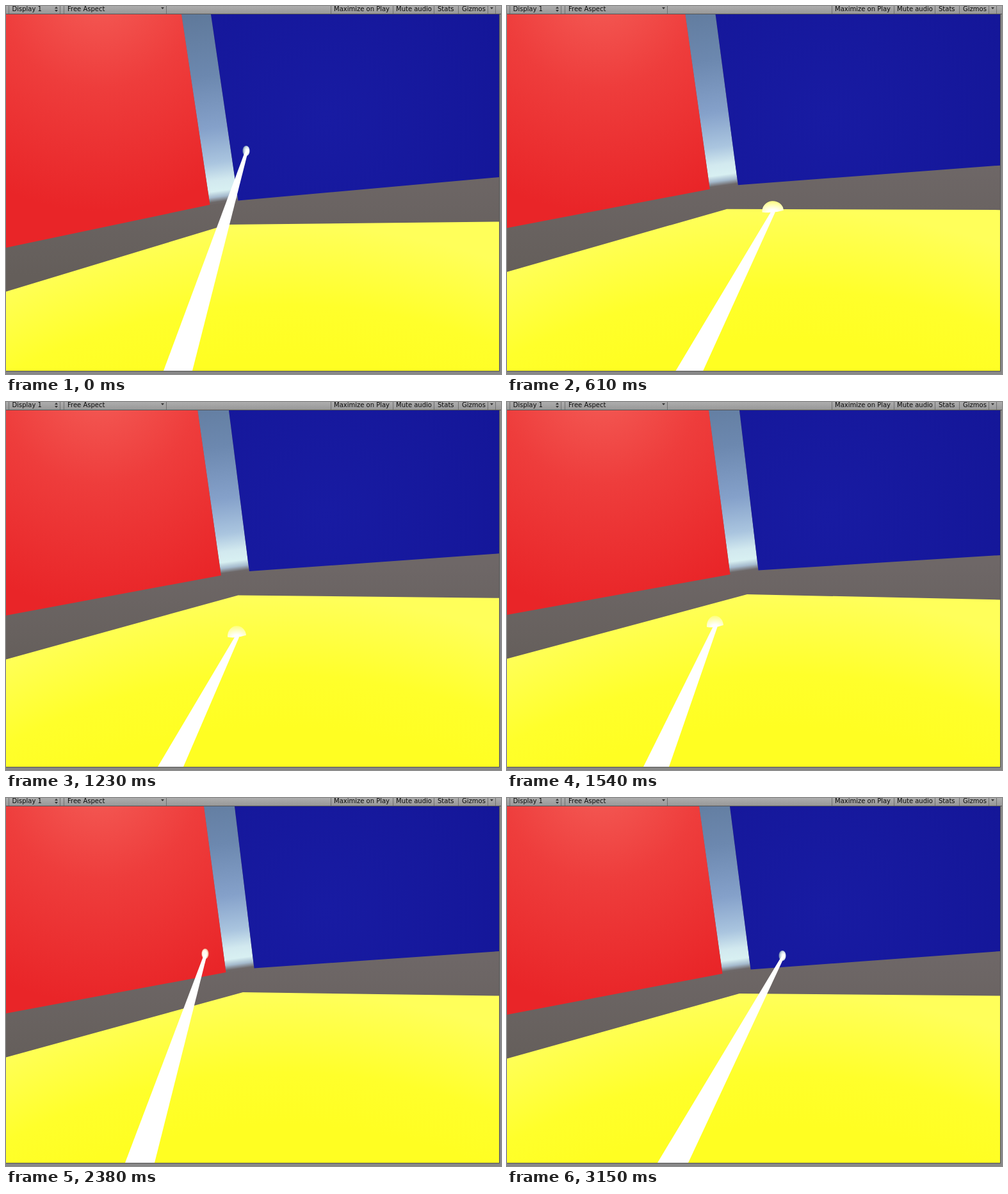
An HTML page that plays this animation: 773x574 px, repeating every 3230 ms.

```html
<!DOCTYPE html>
<html lang="en">
<head>
<meta charset="utf-8">
<title>Pointer in a room</title>
<style>
  html, body { margin: 0; width: 100%; height: 100%; overflow: hidden; background: #878787; }
  svg { display: block; }
  text { font: 10px "DejaVu Sans", Verdana, sans-serif; fill: #0c0c0c; }
</style>
</head>
<body>
<svg width="773" height="574" viewBox="0 0 773 574">
  <defs>
    <clipPath id="view"><rect y="13" width="770" height="556"/></clipPath>
    <linearGradient id="bar" x2="0" y2="1">
      <stop stop-color="#adadad"/><stop offset="1" stop-color="#989898"/>
    </linearGradient>
    <linearGradient id="sky" gradientUnits="userSpaceOnUse">
      <stop stop-color="#5e7899"/>
      <stop offset=".35" stop-color="#6c88af"/>
      <stop offset=".62" stop-color="#85a1ca"/>
      <stop offset=".8" stop-color="#aac5df"/>
      <stop offset=".89" stop-color="#d2e9ef"/>
      <stop offset=".945" stop-color="#d8f0f2"/>
      <stop offset=".975" stop-color="#a5bacd"/>
      <stop offset="1" stop-color="#6d6767"/>
    </linearGradient>
    <linearGradient id="ground" gradientUnits="userSpaceOnUse" x1="0" x2="0" y1="250" y2="420">
      <stop stop-color="#6e6767"/><stop offset="1" stop-color="#645e5a"/>
    </linearGradient>
    <radialGradient id="red" gradientUnits="userSpaceOnUse" cx="145" cy="-30" r="350">
      <stop stop-color="#f45d57"/><stop offset=".45" stop-color="#ee3d3c"/><stop offset="1" stop-color="#e92528"/>
    </radialGradient>
    <radialGradient id="blue" gradientUnits="userSpaceOnUse" cx="500" cy="175" r="330">
      <stop stop-color="#181ba2"/><stop offset="1" stop-color="#141698"/>
    </radialGradient>
    <radialGradient id="yellow" gradientUnits="userSpaceOnUse" cx="430" r="1040">
      <stop offset=".8" stop-color="#fffe22"/><stop offset=".88" stop-color="#ffff2b"/><stop offset="1" stop-color="#ffff5a"/>
    </radialGradient>
    <radialGradient id="cool" cx=".65" cy=".5" r=".65">
      <stop offset=".2" stop-color="#fff"/><stop offset=".6" stop-color="#cfdde8"/><stop offset="1" stop-color="#7088ad"/>
    </radialGradient>
    <radialGradient id="warm" cx=".45" cy=".5" r=".6">
      <stop offset=".5" stop-color="#fffaf0"/><stop offset="1" stop-color="#e9a377"/>
    </radialGradient>
    <radialGradient id="glow" cx=".5" cy=".95" r=".95">
      <stop offset=".2" stop-color="#fff"/><stop offset="1" stop-color="#ffff7d"/>
    </radialGradient>
  </defs>
  <rect width="773" height="574" fill="#878787"/>
  <rect width="773" height="12" fill="url(#bar)"/>
  <path d="M0 12.5H773M0 569.5H771M770.5 13V570" stroke="#555"/>
  <path d="M4.5 0V12M84.5 0V12M90.5 0V12M250.5 0V12M507.5 0V12M604.5 0V12M668.5 0V12M706.5 0V12M752.5 0V12M764.5 0V12" stroke="#707070"/>
  <path d="M76 4h5l-2.500-3zM76 6h5l-2.500 3zM242 2h5l-2.500 3zM756 2h5l-2.500 3z" fill="#333"/>
  <g>
    <text x="9.500" y="8">Display 1</text>
    <text x="96" y="8">Free Aspect</text>
    <text x="512" y="8">Maximize on Play</text>
    <text x="609" y="8">Mute audio</text>
    <text x="674" y="8">Stats</text>
    <text x="712" y="8">Gizmos</text>
  </g>
  <g clip-path="url(#view)">
    <rect y="13" width="770" height="556" fill="url(#ground)"/>
    <polygon id="gap" fill="url(#sky)"/>
    <polygon id="redWall" fill="url(#red)"/>
    <polygon id="blueWall" fill="url(#blue)"/>
    <polygon id="floor" fill="url(#yellow)"/>
    <ellipse id="lobe" rx="5" ry="4" fill="url(#cool)"/>
    <ellipse id="ball" rx="5.5" ry="8"/>
    <path id="dome" fill="url(#glow)"/>
    <polygon id="beam" fill="#fff"/>
  </g>
</svg>
<script>
const LOOP = 3230, FRAMES = 42, TOP = 13, RIGHT = 770, BOTTOM = 569;
const el = id => document.getElementById(id);
const set = (id, attrs) => {
  for (const key in attrs) el(id).setAttribute(key, attrs[key]);
};
const poly = (id, ...points) => set(id, { points: points.join(' ') });

// time, floor corner x y, red top, blue top, red left, blue right, beam left, beam right, spot x y
const keys = [
  [0,    345, 341, 274, 320, 377, 267, 246, 291, 375, 226],
  [380,  342, 326, 277, 323, 356, 258, 261, 305, 415, 283],
  [920,  349, 306, 283, 332, 337, 237, 258, 299, 396, 361],
  [1540, 375, 300, 315, 363, 332, 239, 213, 253, 325, 350],
  [2380, 370, 303, 309, 357, 336, 239, 186, 232, 311, 243],
  [2840, 365, 308, 303, 351, 340, 244, 213, 261, 385, 204],
  [3150, 363, 305, 300, 348, 338, 239, 235, 283, 430, 246]
];

const rate = (i, c) => (keys[i + 1][c] - keys[i][c]) / (keys[i + 1][0] - keys[i][0]);

function slope(i, c) {
  const last = keys.length - 1;
  if (i === 0) return rate(0, c);
  if (i === last) return rate(last - 1, c);
  const before = keys[i][0] - keys[i - 1][0], after = keys[i + 1][0] - keys[i][0];
  return (rate(i - 1, c) * after + rate(i, c) * before) / (before + after);
}

// Smooth Hermite curve through the keys
function pose(t) {
  let i = 0;
  while (i < keys.length - 2 && t >= keys[i + 1][0]) i++;
  const [a, b] = [keys[i], keys[i + 1]];
  const span = b[0] - a[0], u = (t - a[0]) / span, v = 1 - u;
  return a.slice(1).map((start, n) => {
    const c = n + 1;
    return start * v * v * (1 + 2 * u) + b[c] * u * u * (3 - 2 * u)
      + span * u * v * (slope(i, c) * v - slope(i + 1, c) * u);
  });
}

// The picture holds for 70 or 80 ms at a time
const frameStart = k => Math.floor((k * 76.85 + 3.1) / 10) * 10;

function heldTime(t) {
  let k = FRAMES - 1;
  while (k > 0 && frameStart(k) > t) k--;
  return k ? frameStart(k) : 0;
}

function draw(t) {
  const [cx, cy, redTop, blueTop, redLeft, blueRight, beamL, beamR, x, y] = pose(t);
  const red = [cx - 26.5, cy - 31], blue = [cx + 17.5, cy - 37.5];
  const floorLeft = redLeft + 68.5, floorRight = blueRight + 69.5;

  poly('redWall', [0, TOP], [redTop, TOP], red, [0, redLeft]);
  poly('blueWall', [blueTop, TOP], [RIGHT, TOP], [RIGHT, blueRight], blue);
  poly('gap', [redTop, TOP], [blueTop, TOP], blue, red);
  poly('floor', [0, floorLeft], [cx, cy], [RIGHT, floorRight], [RIGHT, BOTTOM], [0, BOTTOM]);

  const midX = cx - 4, horizon = cy - 37;
  set('sky', { x1: midX - 41, y1: horizon - 300, x2: midX, y2: horizon });
  set('yellow', { cy: cy + 1040 });

  const floorEdge = x < cx
    ? floorLeft + (cy - floorLeft) * x / cx
    : cy + (floorRight - cy) * (x - cx) / (RIGHT - cx);
  const blueEdge = blue[1] + (blueRight - blue[1]) * (x - blue[0]) / (RIGHT - blue[0]);
  const onFloor = y > floorEdge;
  const onRed = !onFloor && x < red[0];
  const pastBlue = !onFloor && x > blue[0] && y + 5 > blueEdge;
  const show = on => on ? 'visible' : 'hidden';

  set('ball', { cx: x, cy: y, fill: `url(#${onRed ? 'warm' : 'cool'})`, visibility: show(!onFloor) });
  set('lobe', { cx: x + 6, cy: y + 4, visibility: show(pastBlue) });
  const rx = 13 + (x - 325) / 24;
  set('dome', {
    d: `M${x - rx} ${y + 1}A${rx} 16 0 0 1 ${x + rx} ${y - 2}Q${x} ${y + 3} ${x - rx} ${y + 1}Z`,
    visibility: show(onFloor)
  });
  const half = onFloor ? 3.5 : 2.5, tipY = onFloor ? y + 1 : y + 3;
  poly('beam', [beamL, BOTTOM], [x - half, tipY], [x, tipY - 3], [x + half, tipY], [beamR, BOTTOM]);
}

const origin = performance.now();
function tick() {
  draw(heldTime((performance.now() - origin) % LOOP));
  requestAnimationFrame(tick);
}
tick();
</script>
</body>
</html>
```
